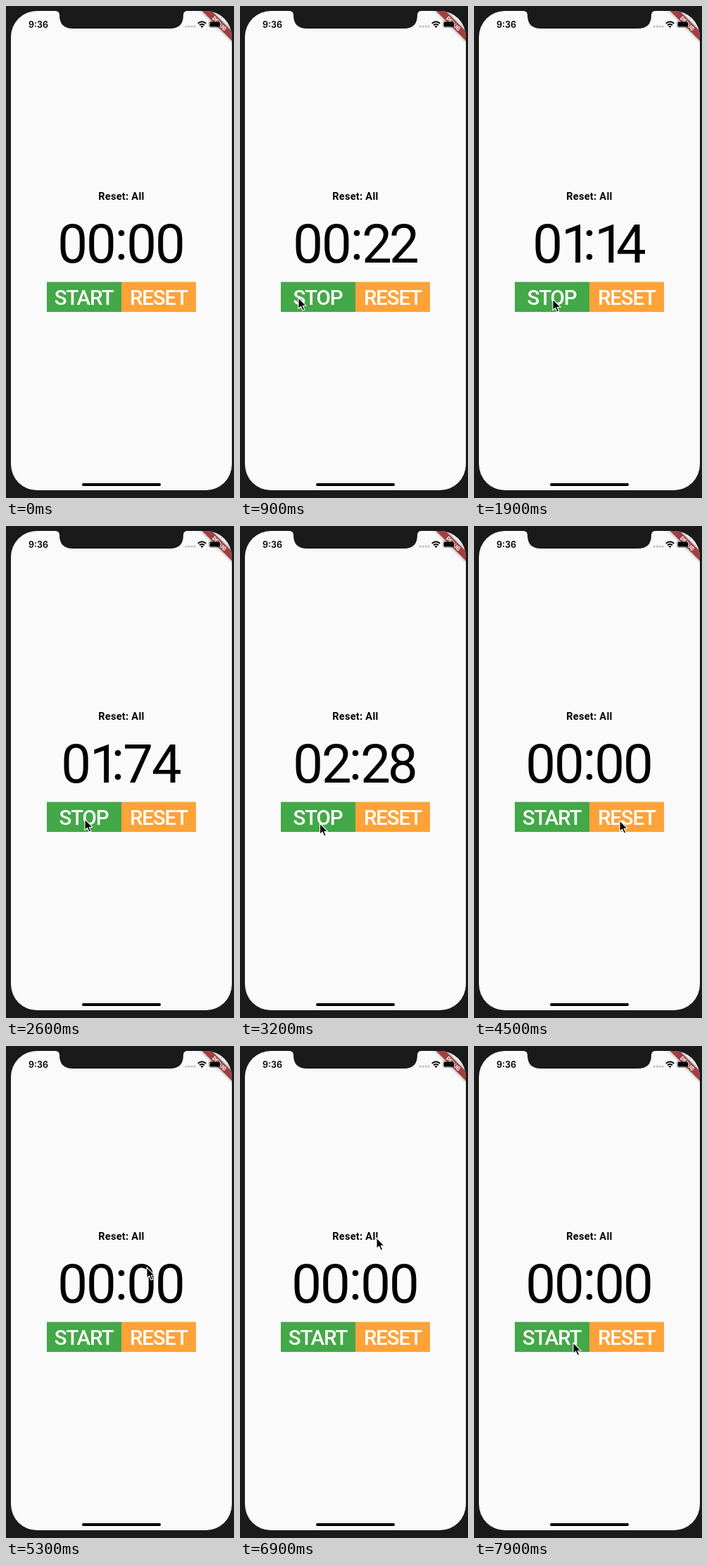
An HTML page that plays this animation: 324x698 px, repeating every 8 s.

```html
<!DOCTYPE html>
<html lang="en">
<head>
<meta charset="utf-8">
<title>Stopwatch</title>
<style>
  html, body { margin: 0; width: 100%; height: 100%; overflow: hidden; background: #1a1a1a; }
  svg { display: block; width: 324px; height: 698px; }
  text { font-family: Roboto, sans-serif; text-anchor: middle; }
  .time { font: 600 12.5px Inter, sans-serif; }
  .label { font-weight: 600; font-size: 14.5px; letter-spacing: .3px; }
  .clock { font-size: 76px; letter-spacing: -2px; }
  .clock .one { letter-spacing: -12px; }
  .clock .two { letter-spacing: -4px; }
  .button { font-weight: 500; font-size: 29.5px; letter-spacing: -1.2px; fill: #fff; }
  .debug { font-weight: 900; font-size: 7.8px; fill: #fff; }
</style>
</head>
<body>
<svg viewBox="0 0 324 698">
  <defs>
    <clipPath id="screen"><rect x="7" y="7" width="314" height="680" rx="37"/></clipPath>
    <filter id="blur" x="-20%" y="-100%" width="140%" height="300%"><feGaussianBlur stdDeviation="2"/></filter>
  </defs>
  <g clip-path="url(#screen)">
    <rect width="324" height="698" fill="#fafafa"/>
    <g transform="translate(321 7) rotate(45)">
      <rect x="-40" y="20.5" width="80" height="9.3" opacity=".5" filter="url(#blur)"/>
      <rect x="-40" y="20.5" width="80" height="9.3" fill="#a23e3f"/>
      <text class="debug" y="28">DEBUG</text>
    </g>
  </g>
  <path d="M70 6H258V7Q252 7 252 13Q252 32 233 32H95Q76 32 76 13Q76 7 70 7Z" fill="#1a1a1a"/>

  <text class="time" x="46" y="30.5">9:36</text>
  <g fill="#bbb">
    <circle cx="256" cy="29" r="1.5"/><circle cx="260" cy="29" r="1.5"/>
    <circle cx="264" cy="29" r="1.5"/><circle cx="268" cy="29" r="1.5"/>
  </g>
  <g fill="none" stroke="#000" stroke-width="2">
    <path d="M272.8 24.8Q278.5 19.6 284.2 24.8M275 27.3Q278.5 24.2 282 27.3"/>
  </g>
  <path d="M276.4 28.8Q278.5 27 280.6 28.8L278.5 31Z"/>
  <rect x="288.2" y="21.2" width="17" height="9.4" rx="2.6" fill="none" stroke="#000" stroke-opacity=".4" stroke-width=".8"/>
  <rect x="289.5" y="22.4" width="14.5" height="7" rx="1.5"/>
  <path d="M306.2 24.4Q308 26 306.2 27.6Z" opacity=".4"/>

  <text class="label" x="164" y="274.5">Reset: All</text>
  <text class="clock" id="clock" x="163" y="364"></text>
  <rect x="58" y="391.5" width="106" height="42.5" fill="#43a847"/>
  <rect x="164" y="391.5" width="106" height="42.5" fill="#ffa238"/>
  <text class="button" id="toggle" x="110.5" y="423.5"></text>
  <text class="button" x="217" y="423.5">RESET</text>
  <rect x="108" y="677" width="112" height="4" rx="2"/>
  <path id="cursor" d="M0 0V15.5L3.6 12.2L6.2 18L8.8 16.9L6.2 11.3H11.2Z" stroke="#fff" stroke-width="1.1" stroke-linejoin="round"/>
</svg>
<script>
  const LOOP = 8000, STEP = 100;
  const START = 660, STOP = 3600, RESET = 4500;
  const $ = id => document.getElementById(id);

  // Each key is [time, ...values]
  const ticks = [[START, 0], [900, 22], [1900, 114], [2600, 174], [STOP, 264]];
  const moves = [
    [100, 141, 421], [500, 83, 414], [1000, 83, 414], [1500, 112, 416],
    [2900, 112, 416], [3300, 114, 424], [3600, 116, 424], [3900, 205, 431],
    [4300, 207, 418], [4700, 207, 418], [5300, 200, 314], [6000, 194, 272],
    [6900, 194, 272], [7900, 141, 421]
  ];

  function sample(keys, t) {
    const i = keys.findIndex(k => k[0] > t);
    if (i < 0) return keys[keys.length - 1].slice(1);
    if (i === 0) return keys[0].slice(1);
    const [a, b] = [keys[i - 1], keys[i]];
    const f = (t - a[0]) / (b[0] - a[0]);
    return a.slice(1).map((v, n) => v + (b[n + 1] - v) * f);
  }

  const pad = n => String(n).padStart(2, '0');

  // The colon sits a little above the baseline
  function glyph(c, i) {
    const name = { 1: 'one', 2: 'two' }[c] || '';
    const dy = i === 2 ? -5 : i === 3 ? 5 : 0;
    return `<tspan class="${name}" dy="${dy}">${c}</tspan>`;
  }

  let shown;
  function draw(now) {
    const t = Math.floor(now % LOOP / STEP) * STEP;
    if (t !== shown) {
      shown = t;
      const count = t < RESET ? Math.round(sample(ticks, t)[0]) : 0;
      const digits = `${pad(Math.floor(count / 100))}:${pad(count % 100)}`;
      $('clock').innerHTML = [...digits].map(glyph).join('');
      $('toggle').textContent = t >= START && t < STOP ? 'STOP' : 'START';
      const [x, y] = sample(moves, t);
      $('cursor').setAttribute('transform', `translate(${x} ${y})`);
      $('cursor').setAttribute('visibility', t < moves[0][0] ? 'hidden' : 'visible');
    }
    requestAnimationFrame(draw);
  }
  draw(performance.now());
</script>
</body>
</html>
```
